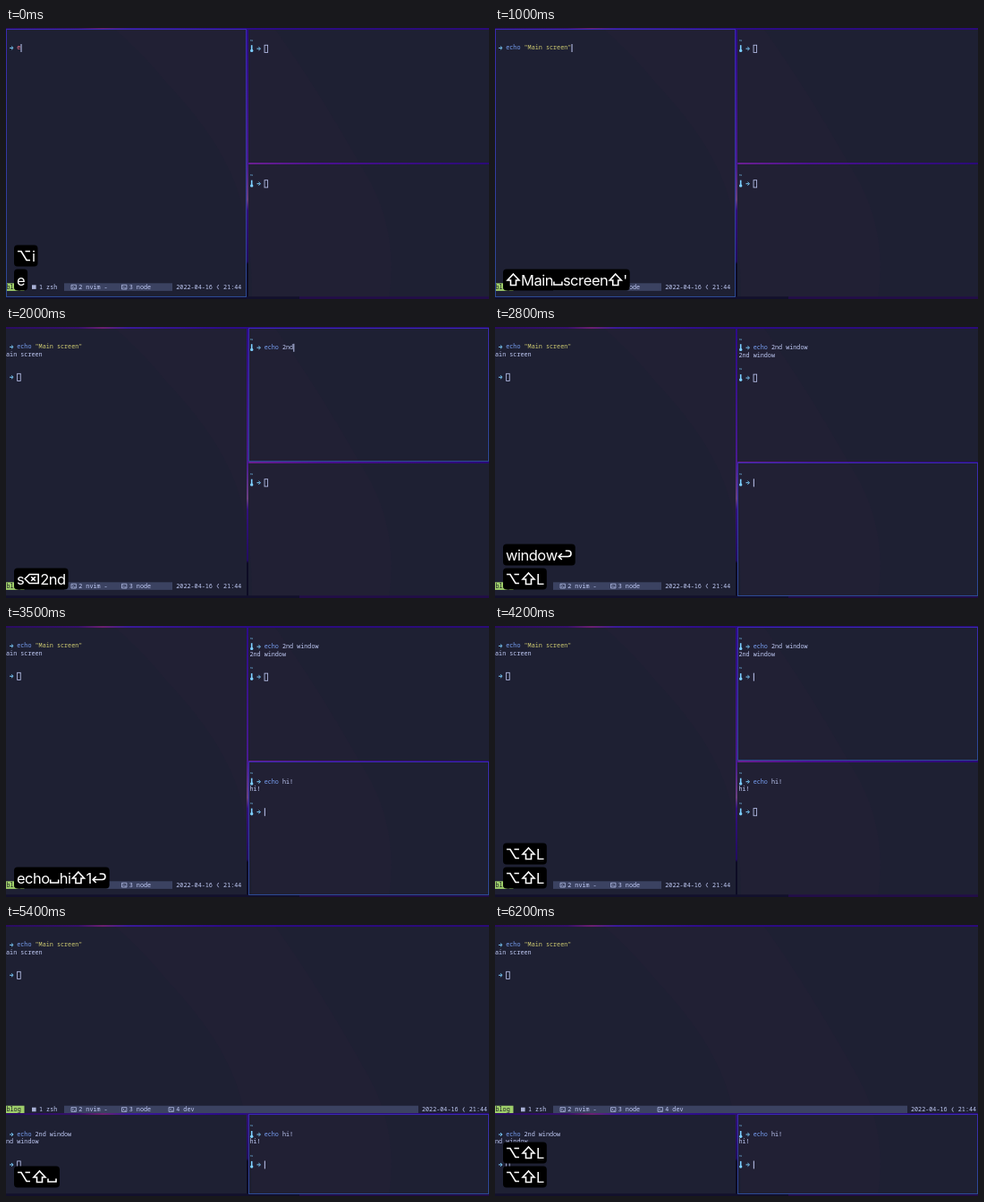
These frames come from a looping animation (540 px wide and 304 px high, 6.3 s). An HTML page with a canvas:

```html
<!DOCTYPE html>
<html lang="en">
<head>
<meta charset="utf-8">
<title>Tiling terminal windows</title>
<style>
  html, body { margin: 0; width: 100%; height: 100%; overflow: hidden; background: #1e2033; }
  canvas { display: block; }
</style>
</head>
<body>
<canvas id="stage" width="540" height="304"></canvas>
<script>
const ctx = document.getElementById('stage').getContext('2d');
const LOOP = 6300, STEP = 100, COL = 4.06, ROW = 8.55;
const MONO = '500 6.77px "Noto Sans Mono", "DejaVu Sans Mono", monospace';
const KEYS = '16.5px Inter, "Liberation Sans", sans-serif', KEY_SPACING = -.5;
const C = { text: '#c0caf5', cyan: '#7dcfff', blue: '#7aa2f7', red: '#f7768e', string: '#d0cc72',
            pane: '#1e2033', bar: '#3b4261', green: '#9ece6a' };

// x, y, width, height, first text column, y of the first prompt
const TALL = [[0, 2, 269, 299.5, -4, 22.4], [271, 2, 269, 149, 272.4, 23.2], [271, 153, 269, 148.5, 272.4, 174.7]];
const WIDE = [[0, 2, 540, 209, -4, 22.4], [0, 213, 269, 88.5, -4, 235], [271, 213, 269, 88.5, 272.4, 235]];
const LAYOUT_CHANGE = 5000;

const shells = [
  { strokes: 'echo "Main screen"', start: 0, end: 1000, enter: 1100, output: 'Main screen' },
  { strokes: 'echo s⌫2nd window', start: 1500, end: 2370, enter: 2500, output: '2nd window' },
  { strokes: 'echo hi!', start: 2900, end: 3300, enter: 3400, output: 'hi!' }
];
const focusChanges = [[0, 0], [1400, 1], [2700, 2], [3800, 0], [4100, 1], [4500, 2], [5600, 0], [5800, 1], [6000, 2]];

// appears, fully typed, disappears, keys
const bezels = [
  [-300, -300, 400, '⌥i'], [0, 400, 800, "echo␣⇧'"], [400, 1040, 1600, "⇧Main␣screen⇧'↩"],
  [1400, 1400, 1900, '⌥⇧L'], [1500, 1700, 1900, 'echo␣'], [1800, 2045, 2500, 's⌫2nd␣'],
  [2100, 2500, 3300, 'window↩'], [2700, 2700, 3400, '⌥⇧L'], [2900, 3400, 4000, 'echo␣hi⇧1↩'],
  [3800, 3800, 4700, '⌥⇧L'], [4100, 4100, 5000, '⌥⇧L'], [4500, 4500, 5300, '⌥⇧L'],
  [5000, 5000, 5800, '⌥⇧␣'],
  [5600, 5600, LOOP, '⌥⇧L'], [5800, 5800, LOOP, '⌥⇧L'], [6000, 6000, LOOP, '⌥⇧L']
];
const icons = {
  '⌥': [17, 'M1-5H5L11 5H15M9.5-5H15'],
  '⇧': [17, 'M8.5-6.5L15 .5H11.5V6H5.5V.5H2Z'],
  '⌫': [18, 'M1 0L6-5H16V5H6ZM8-2.3L12.6 2.3M12.6-2.3L8 2.3'],
  '↩': [17, 'M5-1.5L1.5 2L5 5.5M1.5 2H12A3.2 3.2 0 0 0 12-4.5H9'],
  '␣': [11, 'M1 2V5.5H10V2']
};

function box(x, y, w, h, fill) {
  ctx.fillStyle = fill;
  ctx.fillRect(x, y, w, h);
}

function gradient(x0, y0, x1, y1, stops) {
  const g = ctx.createLinearGradient(x0, y0, x1, y1);
  stops.forEach(([at, color]) => g.addColorStop(at, color));
  return g;
}

function write(text, x, y, color = C.text) {
  ctx.font = MONO;
  ctx.letterSpacing = '0px';
  ctx.textBaseline = 'middle';
  ctx.fillStyle = color;
  ctx.fillText(text, x, y);
}

function strokePath(d, x, y, color, width) {
  ctx.save();
  ctx.translate(x, y);
  ctx.strokeStyle = color;
  ctx.lineWidth = width;
  ctx.stroke(new Path2D(d));
  ctx.restore();
}

function typed(str, start, end, t) {
  if (t < start) return '';
  if (t >= end) return str;
  return str.slice(0, 1 + Math.floor((str.length - 1) * (t - start) / (end - start)));
}

function wallpaper() {
  box(0, 0, 540, 304, gradient(0, 0, 540, 0,
    [[0, '#2a0c62'], [.15, '#35106a'], [.2, '#6a2070'], [.25, '#3a1a98'], [.45, '#2c0b88'], [1, '#2a0b78']]));
  box(271, 150, 269, 4, gradient(271, 0, 540, 0, [[0, '#6a2090'], [.3, '#4a1090'], [1, '#2a0a78']]));
  box(268, 3, 4, 301, gradient(0, 3, 0, 304,
    [[0, '#2c0b88'], [.5, '#4a1a90'], [.63, '#6a4080'], [.67, '#32107c'], [.86, '#220c60'], [.87, '#0d0b24']]));
  box(0, 301, 328, 3, '#12102c');
  box(328, 301, 212, 3, '#220d48');
}

function prompt(x, y) {
  write('~', x, y - ROW, C.cyan);
  box(x + 1.5, y - 4, 1.6, 6, C.cyan);
  ctx.beginPath();
  ctx.arc(x + 2.3, y + 2.2, 1.7, 0, 7);
  ctx.fill();
  strokePath('M0 0H3M2-1.8L4 0L2 1.8', x + 2 * COL, y, C.cyan, 1);
}

function cursor(x, y, focused) {
  if (focused) return box(x + .2, y - 4.4, 1, 9, C.text);
  ctx.strokeStyle = C.text;
  ctx.lineWidth = .8;
  ctx.strokeRect(x + .4, y - 4, 3.6, 8.2);
}

function shellText(shell, x, y, focused, t) {
  let line = '';
  for (const key of typed(shell.strokes, shell.start, shell.end, t))
    line = key === '⌫' ? line.slice(0, -1) : line + key;
  const left = x + 4 * COL, args = line.slice(5);
  prompt(x, y);
  write(line.slice(0, 4), left, y, line.length < 4 ? C.red : C.blue);
  write(args, left + 5 * COL, y, args[0] === '"' ? C.string : C.text);
  if (t < shell.enter) return cursor(left + line.length * COL, y, focused);
  write(shell.output, x, y + ROW);
  prompt(x, y + 4 * ROW - .3);
  cursor(left, y + 4 * ROW - .3, focused);
}

function statusBar(y, width) {
  const end = width < 300 ? 186 : 461;
  const dateX = width < 300 ? 190.3 : 465;
  box(0, y - 4.3, 20.5, 8.6, C.green);
  write('blog', .5, y, '#1a1b26');
  box(29, y - 2.3, 4.6, 4.6, '#a9b1d6');
  write('1 zsh', 37, y);
  box(65, y - 4.3, end - 65, 8.6, C.bar);
  [[73, '2 nvim -'], [129.5, '3 node'], [182, '4 dev']].filter(([x]) => x + 20 < end).forEach(([x, label]) => {
    strokePath('M0-2.4H5.4V2.4H0ZM1.2-1.2L2.4 0L1.2 1.2M3 1.3H4.4', x, y, C.text, .7);
    write(label, x + 8.2, y);
  });
  write('2022-04-16', dateX, y);
  strokePath('M1.5-2.6L0 0L1.5 2.6', dateX + 11.3 * COL, y, C.text, .8);
  write('21:44', dateX + 13 * COL, y);
}

function pane([x, y, w, h, tx, ty], index, focused, t) {
  ctx.save();
  ctx.beginPath();
  ctx.rect(x, y, w, h);
  ctx.clip();
  box(x, y, w, h, C.pane);
  ctx.fillStyle = 'rgba(75, 30, 75, .07)';
  ctx.fill(new Path2D('M120 0Q150 25 180 62Q225 110 245 150Q275 205 275 304H428Q440 225 400 160Q350 70 300 0Z'));
  shellText(shells[index], tx, ty, focused, t);
  if (!index) statusBar(w < 300 ? 290.6 : 207, w);
  ctx.restore();
  if (!focused) return;
  ctx.strokeStyle = gradient(0, y, 0, y + h, [[0, '#3a2ab0'], [1, '#2c4a94']]);
  ctx.lineWidth = 1;
  ctx.strokeRect(x + .5, y - .5, w - 1, Math.round(h));
}

function bezel(keys, y) {
  ctx.font = KEYS;
  ctx.letterSpacing = KEY_SPACING + 'px';
  const advance = key => icons[key] ? icons[key][0] : ctx.measureText(key).width;
  const width = [...keys].reduce((sum, key) => sum + advance(key), 6);
  ctx.fillStyle = '#000';
  ctx.beginPath();
  ctx.roundRect(9, y, width, 24, 4);
  ctx.fill();
  ctx.textBaseline = 'alphabetic';
  ctx.fillStyle = '#fff';
  let x = 12;
  for (const key of keys) {
    if (icons[key]) strokePath(icons[key][1], x, y + 12, '#fff', 1.6);
    else ctx.fillText(key, x, y + 18);
    x += advance(key);
  }
}

function draw(t) {
  const focus = focusChanges.filter(([at]) => at <= t).pop()[1];
  const layout = t < LAYOUT_CHANGE ? TALL : WIDE;
  wallpaper();
  layout.forEach((p, i) => { if (i !== focus) pane(p, i, false, t); });
  pane(layout[focus], focus, true, t);
  bezels.filter(([from, , to]) => from <= t && t < to).slice(-2).reverse()
    .forEach(([from, done, , keys], i) => bezel(typed(keys, from, done, t), 270.5 - 27 * i));
}

const begin = performance.now();
function tick() {
  const t = (performance.now() - begin) % LOOP;
  draw(Math.floor(t / STEP) * STEP);
  requestAnimationFrame(tick);
}
tick();
</script>
</body>
</html>
```
